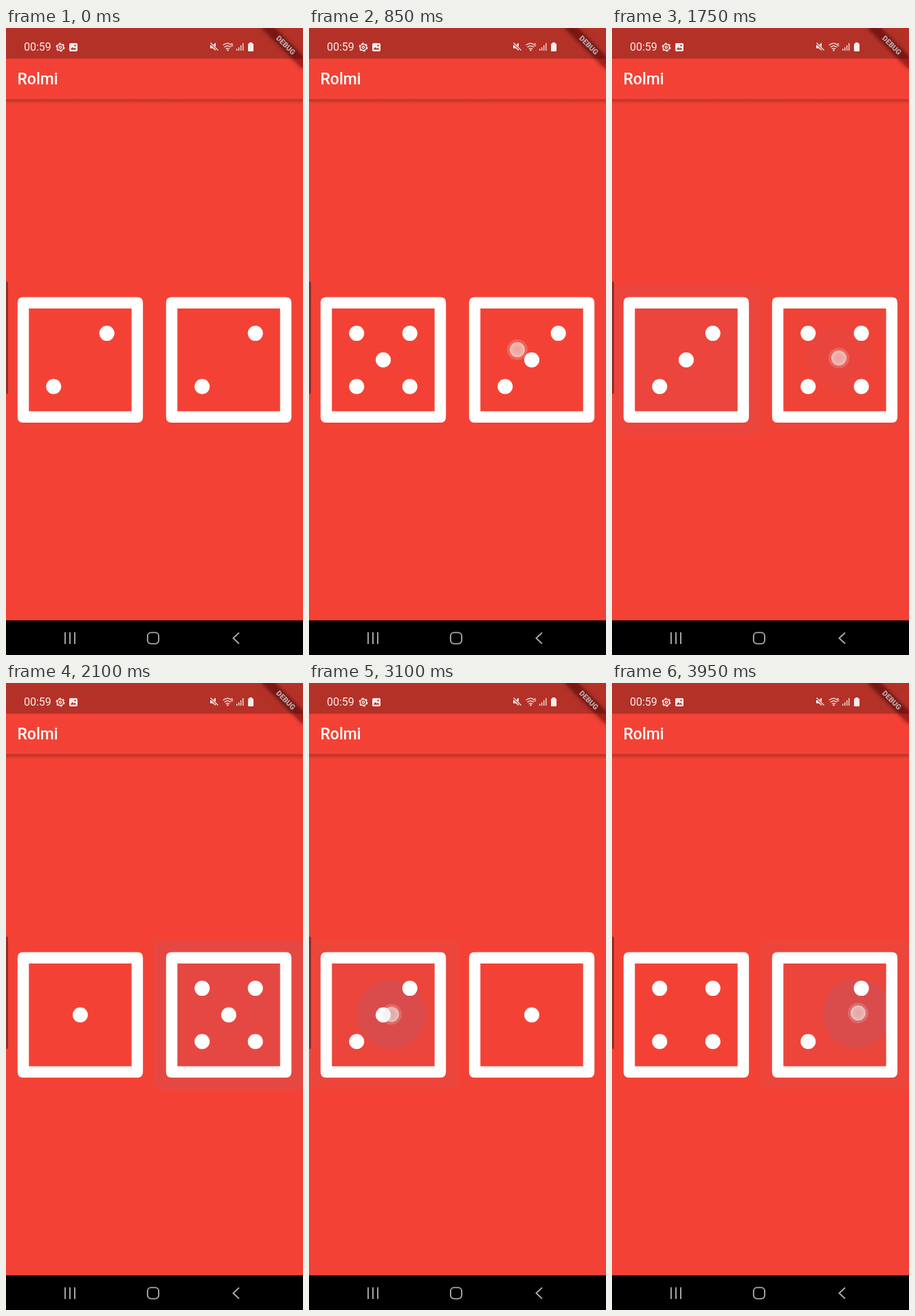
An HTML page for the animation above (4000 ms loop, 432 px wide and 912 px high).

```html
<!DOCTYPE html>
<html lang="en">
<head>
<meta charset="utf-8">
<title>Dice roller</title>
<style>
  html, body { margin: 0; width: 100%; height: 100%; overflow: hidden; background: #f34235; }
  svg { display: block; width: 432px; height: 912px; font-family: Roboto, sans-serif; }
</style>
</head>
<body>
<svg viewBox="0 0 432 912">
  <defs>
    <linearGradient id="shade" x2="0" y2="1">
      <stop stop-opacity=".25"/>
      <stop offset=".4" stop-opacity=".15"/>
      <stop offset="1" stop-opacity="0"/>
    </linearGradient>
    <radialGradient id="touch">
      <stop stop-color="#f0ebeb" stop-opacity=".56"/>
      <stop offset=".6" stop-color="#f0ebeb" stop-opacity=".62"/>
      <stop offset="1" stop-color="#f0ebeb" stop-opacity=".76"/>
    </radialGradient>
    <filter id="blur" x="-30%" y="-150%" width="160%" height="400%"><feGaussianBlur stdDeviation="3.4"/></filter>
    <clipPath id="cell"><rect x="-108" y="-108" width="216" height="216" rx="4"/></clipPath>
  </defs>

  <rect width="432" height="912" fill="#f34235"/>
  <rect y="103.5" width="432" height="7" fill="url(#shade)"/>

  <g id="dice"></g>
  <g id="dot">
    <circle r="13" fill="none" stroke="#ddd" stroke-width="4" stroke-opacity=".22"/>
    <circle r="11" fill="url(#touch)"/>
  </g>

  <rect x="-4" y="368.5" width="7" height="164" rx="3" fill="#902d27"/>

  <text x="16.5" y="82" font-size="23" font-weight="500" fill="#fff">Rolmi</text>

  <!-- corner ribbon -->
  <g transform="translate(432 0) rotate(45)">
    <rect x="-42" y="29.4" width="84" height="12.6" filter="url(#blur)" opacity=".5"/>
    <rect x="-44" y="29.4" width="88" height="12.6" fill="#b71c1c" fill-opacity=".63"/>
    <text y="39.1" font-size="10.7" font-weight="900" text-anchor="middle" fill="#f4eaea">DEBUG</text>
  </g>

  <!-- status bar -->
  <rect width="432" height="44.7" fill-opacity=".26"/>
  <g fill="#f8ecec">
    <text x="26" y="33" font-size="16">00:59</text>
    <g fill="none" stroke="#f8ecec">
      <circle cx="79" cy="28" r="4.6" stroke-width="1.5"/>
      <circle cx="79" cy="28" r="5.7" stroke-width="1.5" stroke-dasharray="2.98 2.98"/>
      <circle cx="79" cy="28" r="1.6" stroke-width="1.3"/>
    </g>
    <rect x="92" y="22" width="12" height="12" rx="2"/>
    <path d="M93.5 31.5l3-3.8 2 2.3 1.5-1.6 2.5 3.1z" fill="#b53228"/>
    <circle cx="100.5" cy="25.5" r="1.2" fill="#b53228"/>

    <path d="M297 25h3.5l4.5-3.5V33l-4.5-3.5H297z"/>
    <path d="M297 21.5L308.5 33" stroke="#b53228" stroke-width="3"/>
    <path d="M297.5 21.5l11 11" stroke="#f8ecec" stroke-width="1.3"/>
    <g opacity=".85">
      <path d="M315.5 25q6.5-5 11.5-1M317.5 28q5-4 9.5 0M319.7 30.5q2.8-2 5.5 0" fill="none" stroke="#f8ecec" stroke-width="1.3"/>
      <circle cx="322.5" cy="32.3" r="1.2"/>
      <text x="326.5" y="26.5" font-size="7" font-weight="700">6</text>
      <path d="M335 30h1.5v3H335zM338 28h1.5v5H338zM341 25h1.5v8H341zM344 22h1.5v11H344z"/>
    </g>
    <path d="M354 21h4v1.5h1q1 0 1 1V33q0 1-1 1h-6q-1 0-1-1v-9.500q0-1 1-1h1z"/>
  </g>

  <!-- navigation bar -->
  <rect y="861.6" width="432" height="51"/>
  <g fill="none" stroke="#aaa" stroke-width="1.9">
    <path d="M86 879v17M93 879v17M100 879v17"/>
    <rect x="205.9" y="879.4" width="16.2" height="16.2" rx="5"/>
    <path d="M339 879.5l-8.500 8 8.500 8"/>
  </g>
</svg>
<script>
const LOOP = 4000, STEP = 50, HOLD = 78, INK = 0.12;
const CELL = 216, CY = 482.8, REACH = CELL / Math.SQRT2;

// start of ink, side, x, y, values rolled on release
const taps = [
  [390, 0, 140, 470, 5, 3],
  [865, 1, 303, 468, 5, 2],
  [1345, 0, 166, 463, 3, 4],
  [1732, 1, 330, 480, 1, 5],
  [2165, 0, 140, 475, 4, 3],
  [2597, 1, 358, 498, 3, 1],
  [3045, 0, 120, 482, 3, 3],
  [3470, 0, 130, 480, 4, 2],
  [3895, 1, 358, 480, 4, 2]
].map(([start, side, x, y, ...roll]) => ({ start, side, x, y, roll }));

const clamp = v => Math.min(1, Math.max(0, v));
const latest = test => taps.filter(test).pop();
const set = (node, attrs) => { for (const k in attrs) node.setAttribute(k, attrs[k]); };

function add(parent, tag, attrs) {
  const node = document.createElementNS('http://www.w3.org/2000/svg', tag);
  set(node, attrs);
  return parent.appendChild(node);
}

// cubic-bezier(.25, .1, .25, 1)
function ease(x) {
  const bezier = (a, b, u) => 3 * a * u * (1 - u) ** 2 + 3 * b * u * u * (1 - u) + u ** 3;
  let lo = 0, hi = 1;
  for (let i = 0; i < 20; i++) {
    const mid = (lo + hi) / 2;
    if (bezier(0.25, 0.25, mid) < x) lo = mid; else hi = mid;
  }
  return bezier(0.1, 1, lo);
}

// column, row and the values on which each pip shows
const pips = [
  [-1, -1, n => n > 3], [1, -1, n => n > 1],
  [-1, 0, n => n === 6], [0, 0, n => n % 2], [1, 0, n => n === 6],
  [-1, 1, n => n > 1], [1, 1, n => n > 3]
];

function makeDie(side) {
  const cx = CELL * (side + 0.5);
  const group = add(document.getElementById('dice'), 'g', { transform: `translate(${cx} ${CY})` });
  const ink = add(group, 'g', { 'clip-path': 'url(#cell)', fill: '#2196f3' });
  const glow = add(ink, 'rect', { x: -108, y: -108, width: CELL, height: CELL });
  const ripple = add(ink, 'circle', {});
  add(group, 'path', {
    fill: '#fff', 'fill-rule': 'evenodd',
    d: 'M-83-91.2H83q8.2 0 8.2 8.2V83q0 8.2-8.2 8.2H-83q-8.2 0-8.2-8.2V-83q0-8.2 8.2-8.2zM-74.7-74.7V74.7H74.7V-74.7z'
  });
  const dots = pips.map(([col, row]) =>
    add(group, 'circle', { cx: col * 38.7, cy: row * 38.7, r: 11, fill: '#fff' }));

  return (t, value) => {
    dots.forEach((dot, i) => set(dot, { opacity: pips[i][2](value) ? 1 : 0 }));
    const tap = latest(p => p.side === side && p.start <= t);
    if (!tap) return set(ink, { opacity: 0 });
    const age = t - tap.start, held = Math.min(age, HOLD), since = age - held;
    const grow = ease(clamp(held / 1000 + since / 225));
    const fade = clamp(age / 75) * (1 - clamp((since - 225) / 150));
    set(ink, { opacity: 1 });
    set(glow, { 'fill-opacity': INK * clamp((held - since) / 200) });
    set(ripple, {
      cx: (tap.x - cx) * (1 - grow),
      cy: (tap.y - CY) * (1 - grow),
      r: REACH * 0.3 + (REACH * 0.7 + 5) * grow,
      'fill-opacity': INK * fade
    });
  };
}

const dice = [makeDie(0), makeDie(1)];
const dot = document.getElementById('dot');

function draw(now) {
  const t = Math.floor(now % LOOP / STEP) * STEP;
  const rolled = latest(p => p.start + HOLD <= t);
  const values = rolled ? rolled.roll : [2, 2];
  dice.forEach((update, i) => update(t, values[i]));

  const tap = latest(p => p.start - 45 <= t);
  set(dot, tap
    ? { transform: `translate(${tap.x} ${tap.y})`, opacity: 1 - clamp((t - tap.start - HOLD) / 200) }
    : { opacity: 0 });
}

const begin = performance.now();
function tick() {
  draw(performance.now() - begin);
  requestAnimationFrame(tick);
}
tick();
</script>
</body>
</html>
```
